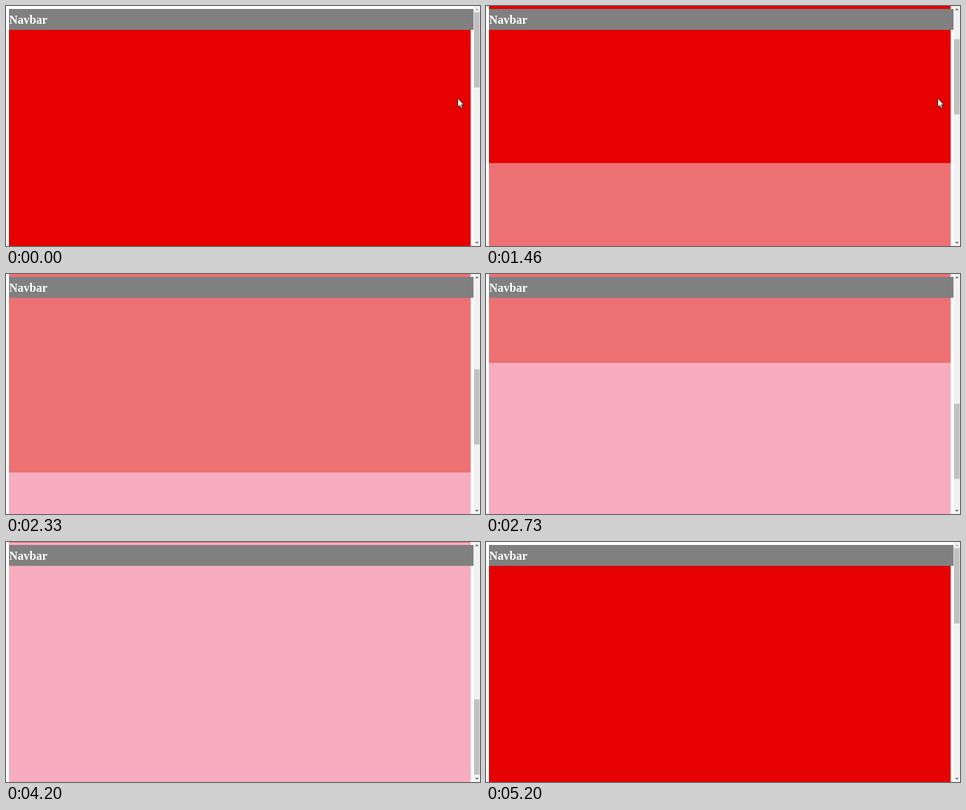
These frames come from a looping animation (640 px wide and 324 px high, 5530 ms). An HTML page:

```html
<!DOCTYPE html>
<html lang="en">
<head>
<meta charset="utf-8">
<title>Fixed navbar</title>
<style>
  html, body { margin: 0; width: 100%; height: 100%; overflow: hidden; background: #fff; }
  svg { display: block; width: 640px; height: 324px; }
  text { font: bold 16px "Liberation Serif", "Times New Roman", serif; fill: #fff; }
</style>
</head>
<body>
<svg viewBox="0 0 640 324">
  <g id="page">
    <rect x="4" y="4" width="623.5" height="324" fill="#e60000"/>
    <rect x="4" y="328" width="623.5" height="324" fill="#ed7172"/>
    <rect x="4" y="652" width="623.5" height="324" fill="#f7adbf"/>
  </g>
  <rect x="4" y="4" width="627.5" height="28.25" fill="#808080"/>
  <text x="4.3" y="24">Navbar</text>

  <rect x="631.5" width="8.5" height="324" fill="#f1f1f1"/>
  <rect id="thumb" x="632" width="7.5" height="101.5" fill="#c1c1c1"/>
  <path id="up" d="M633.5 5.5 L635.75 3.25 L638 5.5 Z"/>
  <path id="down" d="M633.5 318.5 L635.75 320.75 L638 318.5 Z"/>

  <path id="cursor" d="M610 124.5 v12 l2.7 -2.4 1.8 3.9 2 -.9 -1.8 -3.8 h3.5 z"
        fill="#fff" stroke="#111" stroke-width=".8"/>
</svg>
<script>
const LOOP = 5530;
const TICK = 200 / 3;          // the picture advances 15 times a second
const MAX_SCROLL = 656;
const TRACK_TOP = 8.5;
const THUMB_TRAVEL = 205.5;
const CURSOR_HIDDEN_FROM = 30; // tick

// Each spin of the wheel glides the page; times are in ticks.
const glides = [
  { start: 10,    end: 15,    from: 0,   to: 100 },
  { start: 20.85, end: 27.85, from: 100, to: 250 },
  { start: 29.12, end: 44.25, from: 250, to: 600 },
  { start: 45.8,  end: 49.8,  from: 600, to: 700 }, // stopped by the end of the page
  { start: 62.52, end: 78.1,  from: MAX_SCROLL, to: 0 }
];

const [page, thumb, up, down, cursor] =
  ["page", "thumb", "up", "down", "cursor"].map(id => document.getElementById(id));

const clamp = (value, low, high) => Math.min(high, Math.max(low, value));

// Steady speed, with one tick of speeding up and one of slowing down.
function glideProgress(elapsed, duration) {
  const t = clamp(elapsed, 0, duration);
  const left = duration - t;
  const speed = 1 / (duration - 1);
  if (t < 1) return speed * t * t / 2;
  if (left < 1) return 1 - speed * left * left / 2;
  return speed * (t - 0.5);
}

function scrollAt(tick) {
  const { start, end, from, to } = glides.findLast(g => g.start <= tick) ?? glides[0];
  const scroll = from + (to - from) * glideProgress(tick - start, end - start);
  return clamp(Math.round(scroll * 2) / 2, 0, MAX_SCROLL);
}

const arrowColor = enabled => enabled ? "#505050" : "#a3a3a3";

function draw(now) {
  // ticks begin on whole hundredths of a second
  const time = Math.floor((now % LOOP) / 10) * 10;
  const tick = Math.floor((time + 7) / TICK);
  const scroll = scrollAt(tick);

  page.setAttribute("transform", `translate(0 ${-scroll})`);
  thumb.setAttribute("y", TRACK_TOP + scroll / MAX_SCROLL * THUMB_TRAVEL);
  up.setAttribute("fill", arrowColor(scroll > 0));
  down.setAttribute("fill", arrowColor(scroll < MAX_SCROLL));
  cursor.setAttribute("visibility", tick < CURSOR_HIDDEN_FROM ? "visible" : "hidden");
}

const startTime = performance.now();
function frame() {
  draw(performance.now() - startTime);
  requestAnimationFrame(frame);
}
frame();
</script>
</body>
</html>
```
